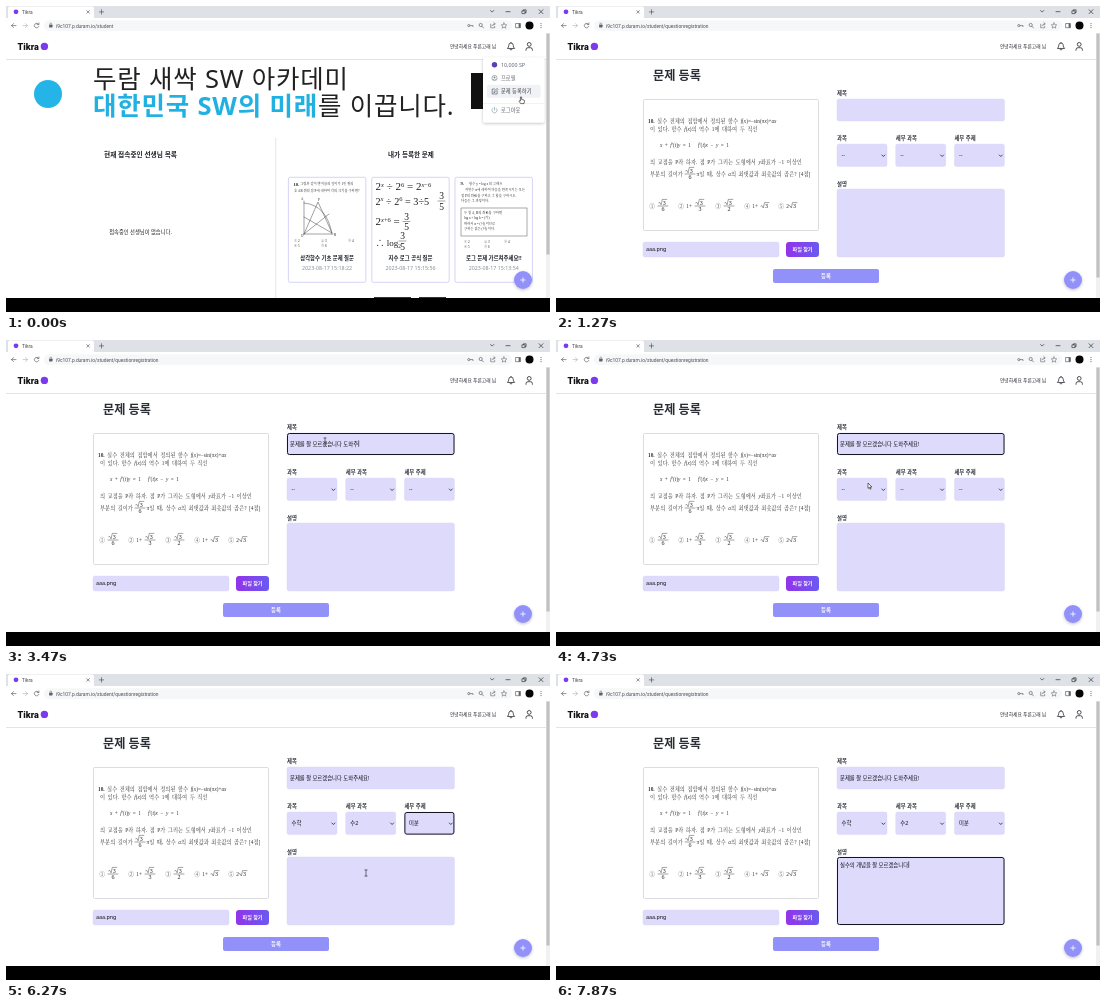
Write an HTML page that moves like this. It is 544x306 px and loops after 8000 ms.

```html
<!DOCTYPE html>
<html lang="ko">
<head>
<meta charset="utf-8">
<title>Tikra</title>
<style>
html, body { margin: 0; width: 100%; height: 100%; overflow: hidden; background: #fff; }
svg { display: block; width: 544px; height: 306px; }
text { font-family: "Noto Sans", "Noto Sans CJK KR", "Noto Sans CJK", sans-serif; white-space: pre; }
.ui { font-family: Roboto, "Noto Sans", sans-serif; }
.math { font-family: "Liberation Serif", "Noto Serif CJK KR", "Noto Sans CJK KR", serif; }
.exam { font-family: "Liberation Serif", "Noto Serif CJK KR", "Noto Sans CJK KR", serif; word-spacing: 1.2px; }
.line { fill: none; stroke-linecap: round; stroke-linejoin: round; }
</style>
</head>
<body>
<svg id="stage" viewBox="0 0 544 306" xmlns="http://www.w3.org/2000/svg"></svg>
<script>
const LOOP = 8000;
const INK = '#20232b', LILAC = '#dddafc', VIOLET = '#9291fa', BRAND = '#7c3aed';

// Drawing helpers that return SVG markup
const rect = (x, y, w, h, fill, more = '') =>
  `<rect x="${x}" y="${y}" width="${w}" height="${h}" fill="${fill}" ${more}/>`;
const text = (x, y, s, size, more = '') =>
  `<text x="${x}" y="${y}" font-size="${size}" ${more}>${s}</text>`;
const line = (d, color = '#444', w = 0.7, more = '') =>
  `<path class="line" d="${d}" stroke="${color}" stroke-width="${w}" ${more}/>`;
const dot = (x, y, r, fill, more = '') => `<circle cx="${x}" cy="${y}" r="${r}" fill="${fill}" ${more}/>`;
const group = (id, body, more = '') => `<g id="${id}" ${more}>${body}</g>`;
const mid = 'text-anchor="middle"';
const math = (x, y, s, size, more = '') => text(x, y, s, size, 'class="math" fill="#222" ' + more);
const sup = s => `<tspan dy="-3.2" font-size="6.5">${s}</tspan><tspan dy="3.2">\u200b</tspan>`;
const root = (x, y, n, s = 6) =>
  line(`M${x} ${y - 2}l1 -.4l1.3 2.4l1.2 -${s * 0.9}h${s * 0.75}`, '#333', 0.45) + math(x + 3.9, y, n, s);
const frac = (x, y, top, bottom, w, s = 6) =>
  top + line(`M${x} ${y}h${w}`, '#333', 0.45) + math(x + w / 2, y + s * 0.9, bottom, s, mid);
const rootFrac = (x, y, n) => frac(x, y, root(x + 0.8, y - 1.2, 3), n, 10);

function browser() {
  const icon = '#5f6368';
  let s = rect(0, 0, 544, 12, '#dee1e6') + rect(0, 12, 544, 15, '#fff') +
    line('M2 12.5V2.5q0-2 2-2H86q2 0 2 2V12.5Z', 'none', 0, 'style="fill:#fff"');
  s += group('chrome',
    dot(10, 5.8, 2.4, BRAND) + text(16, 7.6, 'Tikra', 4.8, 'class="ui" fill="#444"') +
    line('M80.8 4.6l2.6 2.6m0-2.6l-2.6 2.6M93.3 5.9h4.4M95.5 3.7v4.4', '#444', 0.6) +
    line('M484.6 4.5l1.6 1.6l1.6-1.6M500 5.7h4M533 3.7l4 4m0-4l-4 4', '#222', 0.65) +
    line('M516.3 4.8h2.8v2.8h-2.8zM517.3 4.8v-1h2.8v2.8h-1', '#222', 0.6));
  s += line('M10 19.6H5.5m2-2l-2 2l2 2', icon) + line('M17 19.6h4.5m-2-2l2 2l-2 2', '#b5b8bc') +
    line('M32.6 18.3a2.3 2.3 0 1 0 .2 2.2M32.9 16.9v1.7h-1.7', icon);
  s += rect(38, 14.2, 468, 10.8, '#f6f7f8', 'rx="5.4"') +
    rect(43.1, 18.8, 3.4, 2.7, icon, 'rx=".4"') + line('M43.9 18.8v-.9a.9 .9 0 0 1 1.8 0v.9', icon, 0.5);
  s += `<text id="url" x="50" y="21.6" font-size="4.85" class="ui" fill="#4a4d52"></text>`;
  s += dot(462.8, 19.6, 1.1, 'none', `stroke="${icon}" stroke-width=".7"`) + line('M464 19.6h3v1', icon) +
    dot(474.7, 19, 1.6, 'none', `stroke="${icon}" stroke-width=".7"`) + line('M475.9 20.3l1.6 1.6', icon) +
    line('M484.7 18.2v3.6h4v-1.5M486 19.8q.3-2 3-2m-1.2-1.2l1.3 1.2l-1.3 1.2', icon, 0.6) +
    line('M498 16.9l.8 1.8l2 .2l-1.5 1.3l.5 2l-1.8-1.1l-1.8 1.1l.5-2l-1.5-1.3l2-.2z', icon, 0.55) +
    line('M510 17.5h4.4v4.2h-4.4z', icon) + rect(512.6, 17.5, 1.8, 4.2, icon) + dot(523.5, 19.6, 4, '#050505');
  for (const y of [17.6, 19.6, 21.6]) s += dot(535, y, 0.55, icon);
  return s;
}

function header() {
  return rect(0, 27, 540, 26, '#fff') + rect(0, 53, 540, 0.8, '#d9d9dc') + rect(0, 53.8, 540, 1.2, '#f3f3f5') +
    text(11.6, 43.7, 'Tikra', 9, 'class="ui" font-weight="900" fill="#111"') + dot(38.4, 40.4, 3.7, BRAND) +
    text(444, 41.8, '안녕하세요 푸른고래 님', 4.75, `fill="${INK}"`) +
    line('M501.7 42.2q1.1-1.1 1.1-3a2.2 2.2 0 0 1 4.4 0q0 1.9 1.1 3zM504 43.6q1 1 2 0M505 36.9v-.5', INK, 0.75) +
    dot(523.2, 38.4, 1.9, 'none', `stroke="${INK}" stroke-width=".8"`) +
    line('M520 44.3v-.6q0-2 2-2h2.4q2 0 2 2v.6', INK, 0.8);
}

function card(x, title, date, body) {
  return rect(x, 171.3, 77.4, 105, '#fff', 'rx="1.5" stroke="#cbc8f6" stroke-width=".8"') + body +
    text(x + 38.7, 254, title, 5.4, `${mid} font-weight="600" fill="${INK}"`) +
    text(x + 38.7, 264, date, 5.3, `${mid} fill="#8a8d96"`);
}

function dashboard() {
  const tiny = (x, y, s) => math(x, y, s, 3.3);
  const choices = (x, gap, y, n) => [...'①②③④⑤'].slice(0, n)
    .map((c, i) => tiny(x + i % 3 * gap, y + (i > 2 ? 5 : 0), c + ' ' + (i + 2))).join('');
  let s = rect(0, 54, 540, 238, '#fff') + dot(42, 88, 14, '#25b4e8') +
    text(87, 82.3, '두람 새싹 SW 아카데미', 25.5, 'letter-spacing=".8" fill="#222"') +
    text(87, 109.3, '<tspan font-weight="700" fill="#20b0e2">대한민국 SW의 미래</tspan>를 이끕니다.', 25.5,
      'letter-spacing=".8" fill="#222"') +
    rect(465, 67, 36, 36, '#111') + rect(269.4, 132, 0.8, 160, '#dedee3') +
    text(134.5, 151.3, '현재 접속중인 선생님 목록', 6.7, `${mid} font-weight="600" fill="${INK}"`) +
    text(405, 151.3, '내가 등록한 문제', 6.6, `${mid} font-weight="600" fill="${INK}"`) +
    text(134.5, 228.2, '접속중인 선생님이 없습니다.', 5.3, `${mid} fill="#222"`);

  const triangle = math(287.5, 179.5, '10.', 4.6, 'font-weight="700"') +
    tiny(294, 179.3, '그림과 같이 반지름의 길이가 1인 원의') + tiny(288, 185.6, '호 AB 위의 점 P에 대하여 각의 크기를 구하면?') +
    line('M298 228V195M298 228H327M298 228L312 196L326 227L298 211M298 228L323 208M298 197Q321 199 326 228', '#444', 0.5) +
    tiny(295, 194, 'A') + tiny(312, 194.5, 'P') + tiny(328, 230, 'B') + tiny(295, 231, 'O') + choices(288, 27, 236, 5);
  s += card(282.4, '삼각함수 기초 문제 질문', '2023-08-17 15:18:22', triangle);

  const it = c => `<tspan font-style="italic">${c}</tspan>`;
  const big = (y, m, size = 11) => math(369.5, y, m, size);
  const threeFifths = (x, y) => frac(x, y, math(x + 3.5, y - 1.8, '3', 9.5, mid), '5', 7, 9.5);
  const logs = big(184, `2${sup(it('x'))} ÷ 2${sup('6')} = 2${sup(it('x') + '−6')}`) +
    big(198.5, `2${sup(it('x'))} ÷ 2${sup('6')} = 3÷5`, 10.2) + threeFifths(432, 195) +
    big(219, `2${sup(it('x') + '+6')} =`) + threeFifths(397, 215.5) +
    big(240, '∴ log<tspan dy="2" font-size="5.5">2</tspan>', 9) + threeFifths(393, 235);
  s += card(365.8, '지수 로그 공식 질문', '2023-08-17 15:15:56', logs);

  const exam = math(454.5, 179, '9.', 4.6, 'font-weight="700"') + tiny(463, 179, '함수 y = log x 의 그래프') +
    tiny(459, 185, '자연수 n에 대하여 다음을 만족시키는 모든') + tiny(455, 190.5, '점 P의 좌표를 구하고 그 합을 구하시오.') +
    tiny(455, 196, '다음은 그 과정이다.') + rect(455, 202, 66, 28, 'none', 'stroke="#555" stroke-width=".5"') +
    tiny(458, 207.5, '두 점 A, B의 좌표를 구하면') + tiny(458, 213, 'log a + log b = (가)') +
    tiny(458, 218.5, '따라서 n = (나) 이므로') + tiny(458, 224, '구하는 값은 (다) 이다.') + choices(458, 20, 237, 5);
  s += card(449, '로그 문제 가르쳐주세요!!', '2023-08-17 15:13:54', exam);
  s += rect(368, 291, 37, 1, '#333') + rect(413, 291, 27, 1, '#333');

  const item = (y, label, color = '#5b6070') => text(495, y + 2, label, 5.3, `fill="${color}"`);
  const ring = y => dot(488.5, y, 2.6, 'none', 'stroke="#777c8a" stroke-width=".6"');
  s += rect(477, 51.5, 61.5, 65, '#fff', 'rx="2" filter="url(#soft)"') + rect(481, 78.8, 53.5, 13, '#f1f2f5', 'rx="1.5"') +
    rect(477, 97.5, 61.5, 0.5, '#e4e5e8') +
    dot(488.5, 58.8, 2.7, '#5b3fb8') + item(58.5, '10,000 SP') +
    ring(72) + dot(488.5, 71.3, 0.9, '#777c8a') + line('M486.9 73.6q1.6-1.5 3.2 0', '#777c8a', 0.5) + item(72, '프로필') +
    line('M488.5 83h-2.3v5h5v-2.4M488 86.4l.3-1.3l2.7-2.7l1 1l-2.7 2.7z', '#444a58', 0.6) + item(85, '문제 등록하기', '#3c4250') +
    line('M486.9 102.2a2.6 2.6 0 1 0 3.2 0M488.5 101.2v3', '#7d97a8', 0.6) + item(104.3, '로그아웃');
  return s;
}

function problem() {
  const row = (x, y, s) => text(x, y, s, 5.25, 'class="exam" fill="#333"');
  const i = c => `<tspan font-style="italic">${c}</tspan>`;
  const fx = i('f') + '(' + i('x') + ')', ft = i('f') + '′(' + i('t') + ')';
  return row(92, 116.7, `<tspan font-weight="700">10.</tspan> 실수 전체의 집합에서 정의된 함수 ${fx}=−sin(π${i('x')})+${i('ax')}`) +
    row(94, 124.8, `이 있다. 함수 ${fx}의 역수 1에 대하여 두 직선`) +
    row(104, 141, `${i('x')} + ${ft}${i('y')} = 1`) + row(142, 141, `${ft}${i('x')} − ${i('y')} = 1`) +
    row(94, 157.7, `의 교점을 P라 하자. 점 P가 그리는 도형에서 ${i('y')}좌표가 −1 이상인`) +
    row(94, 169.8, '부분의 길이가') + rootFrac(129, 168, 6) +
    row(140.5, 169.8, `π일 때, 상수 ${i('a')}의 최댓값과 최솟값의 곱은? [4점]`) +
    row(93.5, 202, '①') + rootFrac(102, 200, 6) + row(122.5, 202, '② 1+') + rootFrac(139, 200, 3) +
    row(159.5, 202, '③') + rootFrac(168, 200, 2) + row(188.5, 202, '④ 1+') + root(205, 202, 3) +
    row(222.5, 202, '⑤ 2') + root(233, 202, 3);
}

const selects = [
  { x: 281, label: '과목', value: '수학', on: 4800, set: 5130 },
  { x: 339.7, label: '세부 과목', value: '수2', on: 5350, set: 5530 },
  { x: 398.4, label: '세부 주제', value: '미분', on: 5930, set: 6070 }
];

function form() {
  const field = (x, y, w, h) => rect(x, y, w, h, LILAC, 'rx="2" stroke="#d6d3f2" stroke-width=".4"');
  const label = (x, y, s) => text(x, y, s, 5.4, `font-weight="600" fill="#33363f"`);
  const value = (id, x, y) => `<text id="${id}" x="${x}" y="${y}" font-size="5.35" fill="#0c0d12"></text>`;
  let s = rect(0, 54, 540, 238, '#fff') +
    text(97, 74, '문제 등록', 12.2, `font-weight="600" fill="#2a2d36"`) +
    rect(87.5, 93.5, 175, 131, '#fff', 'rx="1" stroke="#d4d4d8" stroke-width=".8"') +
    text(174.7, 161, '사진을 등록해주세요', 7.85, `id="empty" ${mid} fill="#333"`) + group('problem', problem()) +
    field(87, 236, 136, 15) + value('file', 90, 245.2) +
    rect(230, 236, 33, 15, 'url(#button)', 'rx="3"') +
    text(246.5, 245.4, '파일 찾기', 5.1, `${mid} font-weight="600" fill="#fff"`) +
    rect(217, 263, 106, 14, VIOLET, 'rx="2"') + text(270, 272, '등록', 5.4, `${mid} font-weight="600" fill="#fff"`) +
    label(281, 89.2, '제목') + field(281, 93, 167.5, 22) + value('title', 284, 105.6) +
    label(281, 179.5, '설명') + field(281, 183, 167.5, 68) + value('about', 284, 192.6);
  selects.forEach((f, i) => {
    s += label(f.x, 134.4, f.label) + field(f.x, 138, 50, 22.6) + value('pick' + i, f.x + 4.6, 151.2) +
      line(`M${f.x + 44.9} 149l1.5 1.5l1.5-1.5`, '#222', 0.8);
  });
  return s + rect(0, 0, 0, 0, 'none', 'id="focus" rx="2" stroke="#15161c" stroke-width="1"') +
    rect(0, 0, 0.6, 6.4, '#111', 'id="caret"');
}

const stage = document.getElementById('stage');
stage.innerHTML = `<defs>
  <linearGradient id="button"><stop stop-color="#9333ea"/><stop offset="1" stop-color="#6a5af0"/></linearGradient>
  <filter id="soft" x="-20%" y="-20%" width="140%" height="150%"><feDropShadow dx="0" dy="1" stdDeviation="1.5" flood-opacity=".25"/></filter>
  </defs>` + rect(0, 0, 544, 306, '#fff') + browser() + header() + group('home', dashboard()) + group('form', form()) +
  rect(540, 27, 4, 265, '#f1f1f1') + rect(540.4, 27.5, 3.2, 244, '#c1c1c4', 'id="thumb"') +
  dot(517, 274, 9, VIOLET, 'filter="url(#soft)"') + line('M514.8 274h4.4M517 271.8v4.4', '#fff', 0.8) +
  rect(0, 292, 544, 14, '#000') +
  group('cursor',
    `<path id="arrow" d="M0 0V5.4L1.3 4.3L2.2 6.3L3 5.9L2.2 4H3.9Z" fill="#fff" stroke="#111" stroke-width=".6"/>` +
    `<path id="hand" d="M-.6 0q.6-.8 1.2 0V2.5L3 3Q3.7 3.2 3.5 4L3 6.6H-.3L-2 4.2Q-1.8 3.2-.6 4Z" fill="#fff" stroke="#111" stroke-width=".6"/>` +
    line('M-1.1-3H1.1M0-3V3M-1.1 3H1.1', '#222', 0.6, 'id="beam"'));

const el = {};
stage.querySelectorAll('[id]').forEach(n => el[n.id] = n);
const show = (id, on) => el[id].setAttribute('display', on ? 'inline' : 'none');
const put = (id, s) => { if (el[id].textContent !== s) el[id].textContent = s; };
const set = (id, attrs) => { for (const k in attrs) el[id].setAttribute(k, attrs[k]); };

// Every state of a text as it is keyed in, syllable by syllable
function keystrokes(s, before = '') {
  const leads = 'ㄱㄲㄴㄷㄸㄹㅁㅂㅃㅅㅆㅇㅈㅉㅊㅋㅌㅍㅎ', states = [before];
  for (const c of s) {
    const n = c.charCodeAt(0) - 0xac00;
    if (n >= 0 && n < 11172) {
      states.push(before + leads[Math.floor(n / 588)]);
      if (n % 28) states.push(before + String.fromCharCode(0xac00 + n - n % 28));
    }
    states.push(before += c);
  }
  return states;
}
const typed = (states, from, to, t) =>
  states[Math.max(0, Math.min(states.length - 1, Math.floor((t - from) / (to - from) * (states.length - 1))))];

const opening = '문제를 잘 모르겠습니다 도와주';
const titleA = keystrokes(opening), titleB = keystrokes('세요!', opening);
const aboutKeys = keystrokes('실수의 개념을 잘 모르겠습니다');

// Pointer stops: time, x, y
const path = [[0, 515, 91], [70, 515, 91], [470, 246, 242], [1330, 262, 264], [1600, 246, 242], [1800, 246, 242],
  [2500, 319, 101], [4600, 319, 101], [4730, 312, 143], [4850, 312, 148], [5000, 306, 172], [5130, 306, 172],
  [5330, 362, 150], [5470, 362, 152], [5530, 362, 177], [5800, 362, 177], [5930, 420, 150], [6060, 420, 177],
  [6100, 420, 177], [6270, 360, 199], [LOOP, 360, 199]];

function pointer(t) {
  const i = path.findIndex(p => p[0] > t), [t0, x0, y0] = path[i - 1], [t1, x1, y1] = path[i];
  const u = (t - t0) / (t1 - t0), e = u * u * (3 - 2 * u);
  return [x0 + (x1 - x0) * e, y0 + (y1 - y0) * e];
}
const inside = (x, y, l, t, w, h) => x > l && x < l + w && y > t && y < t + h;

function movePointer(t) {
  const [x, y] = pointer(t);
  const hand = t < 70 || inside(x, y, 230, 236, 33, 15) || inside(x, y, 217, 263, 106, 14);
  const beam = !hand && (inside(x, y, 281, 93, 167, 22) || inside(x, y, 281, 183, 167, 68));
  set('cursor', { transform: `translate(${x.toFixed(2)} ${y.toFixed(2)})` });
  show('cursor', !(t >= 670 && t < 1330) && t < 6670);
  show('hand', hand);
  show('beam', beam);
  show('arrow', !hand && !beam);
}

function moveFocus(t) {
  let box = null, input = null;
  if (t >= 2560) { box = [281, 93, 167.5, 22]; input = 'title'; }
  for (const f of selects) if (t >= f.on) { box = [f.x, 138, 50, 22.6]; input = null; }
  if (t >= 6400) { box = [281, 183, 167.5, 68]; input = 'about'; }
  show('focus', box);
  if (box) set('focus', { x: box[0] + 0.5, y: box[1] + 0.5, width: box[2] - 1, height: box[3] - 1 });

  const busy = t < 3800 || t > 6640;
  const lit = input && (busy || Math.floor((t - 3800) / 530) % 2 === 0);
  show('caret', lit);
  if (lit) set('caret', { x: 284.4 + el[input].getComputedTextLength(), y: input === 'title' ? 100.4 : 187.4 });
}

function draw(t) {
  const home = t < 70, loaded = t >= 1270;
  show('home', home);
  show('form', !home);
  put('url', 'i9c107.p.duram.io/student' + (home ? '' : '/questionregistration'));
  set('thumb', { height: home ? 221 : 244 });
  set('chrome', { opacity: t >= 670 && t < 1270 ? 0.55 : 1 });
  show('empty', !loaded);
  show('problem', loaded);
  put('file', loaded ? 'aaa.png' : '현재 등록된 사진이 없습니다');
  put('title', t < 3500 ? typed(titleA, 2640, 3450, t) : typed(titleB, 3500, 3800, t));
  put('about', typed(aboutKeys, 6640, 7830, t));
  selects.forEach((f, i) => put('pick' + i, t >= f.set ? f.value : '--'));
  movePointer(t);
  moveFocus(t);
}

const start = performance.now();
function tick() {
  draw((performance.now() - start) % LOOP);
  requestAnimationFrame(tick);
}
tick();
</script>
</body>
</html>
```
